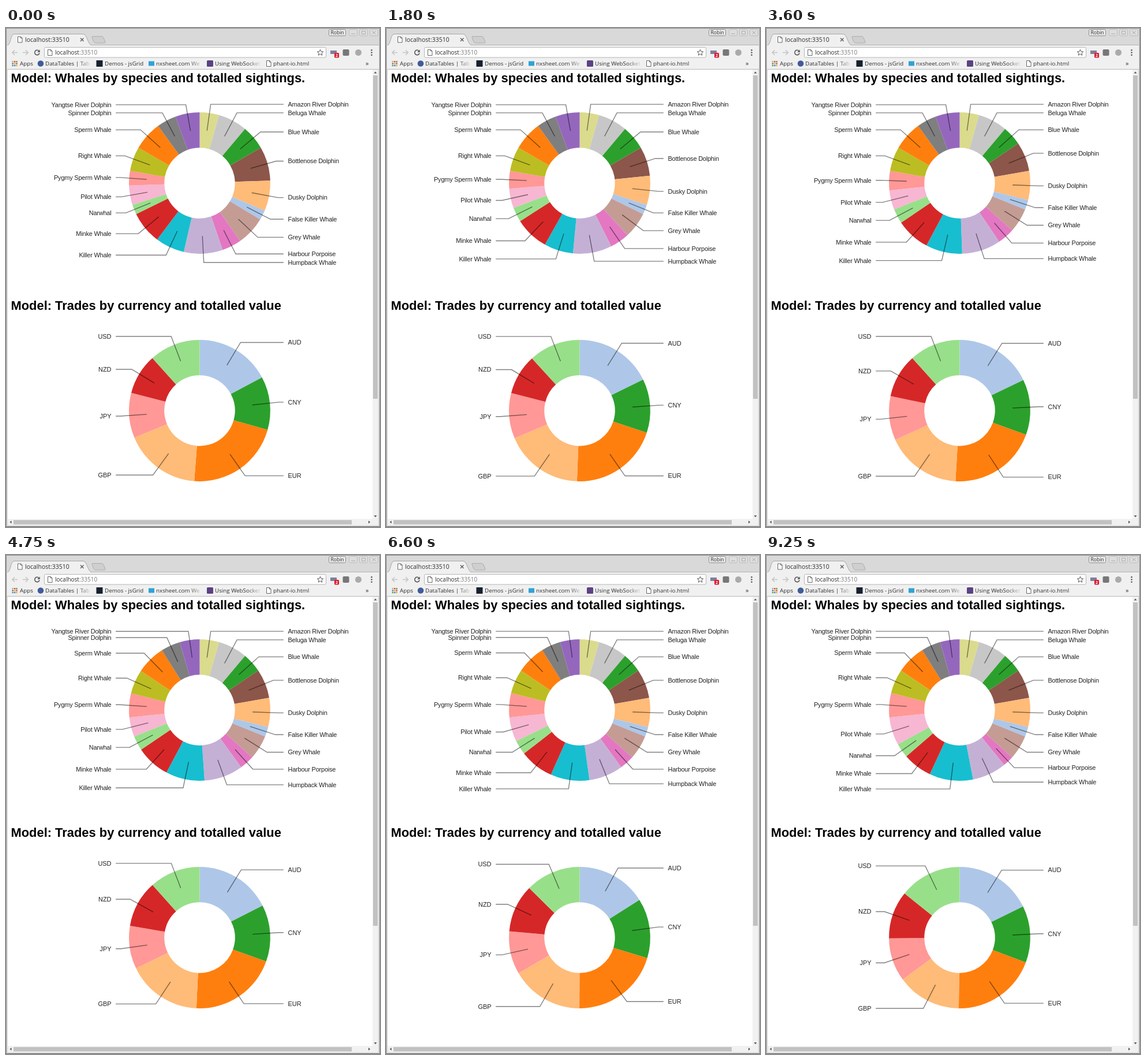
An HTML page that plays this animation: 648 by 864 pixels, repeating every 9.35 s.

```html
<!DOCTYPE html>
<html lang="en">
<head>
<meta charset="utf-8">
<title>localhost:33510</title>
<style>
  html, body { margin: 0; width: 100%; height: 100%; overflow: hidden; background: #fff; }
  svg { display: block; width: 648px; height: 864px; }
  .ui { font-family: "Open Sans", "Noto Sans", sans-serif; fill: #2e2e2e; }
  h1, .head { font: bold 21.9px "Liberation Sans", Arial, sans-serif; fill: #000; }
  .label { font: 10.95px "Liberation Sans", Arial, sans-serif; fill: #222; }
  .tight { letter-spacing: -.19px; }
  .lead { fill: none; stroke: #000; stroke-width: 1.37; opacity: .5; }
</style>
</head>
<body>
<svg viewBox="0 0 648 864" xmlns="http://www.w3.org/2000/svg">
  <defs>
    <linearGradient id="fade">
      <stop offset="0" stop-color="#f0f0f0" stop-opacity="0"/>
      <stop offset="1" stop-color="#f0f0f0"/>
    </linearGradient>
    <g id="page">
      <path d="M.5 .5H5.5L8 3V10.5H.5Z" fill="#fff" stroke="#666"/>
      <path d="M5.5 .5V3H8" fill="none" stroke="#666"/>
    </g>
  </defs>

  <!-- window frame and tab strip -->
  <rect width="648" height="864" fill="#d9d9d9"/>
  <path d="M.5 864V.5H647.5V864" fill="none" stroke="#8a8a8a"/>
  <path d="M1 863.5H647" stroke="#5a5a5a"/>
  <rect x="2" y="30" width="644" height="42" fill="#f0f0f0"/>
  <path d="M2 29.5H646" stroke="#b2b2b2"/>
  <path d="M3 30C8 29 8 11 14 11H134C140 11 142 29 148 30Z" fill="#f0f0f0"/>
  <path d="M3 29.5C8 29 8 10.5 14 10.5H134C140 10.5 142 29 148 29.5" fill="none" stroke="#a8a8a8"/>
  <path d="M150 14.5H165Q168 14.5 169 17L172 24Q172 26 170 26H156Q153 26 152 24L149 16Q149 14.5 150 14.5Z" fill="#cfcfcf" stroke="#adadad"/>
  <use href="#page" x="20" y="14.5"/>
  <path d="M129 17.5L134.5 23M134.5 17.5L129 23" stroke="#555" stroke-width="1.2"/>
  <rect x="559.5" y="2.5" width="29" height="11" rx="2" fill="#e9e9e9" stroke="#8d8d8d"/>
  <g fill="#dedede" stroke="#bdbdbd">
    <rect x="594.5" y="2.5" width="14" height="11" rx="2"/>
    <rect x="612.5" y="2.5" width="14" height="11" rx="2"/>
    <rect x="630.5" y="2.5" width="14" height="11" rx="2"/>
    <path d="M598 10H605M616.5 5.5H622.5V10.5H616.5ZM634.5 5.5L640.5 10.5M640.5 5.5L634.5 10.5" fill="none" stroke="#aaa"/>
  </g>

  <!-- toolbar -->
  <g fill="none" stroke-width="1.5">
    <path d="M20 42.5H11M15 38.3L10.8 42.5L15 46.7M29 42.5H38M34 38.3L38.2 42.5L34 46.7" stroke="#c4c4c4"/>
    <path d="M57 39.6A4.2 4.2 0 1 0 58 43.5" stroke="#555"/>
  </g>
  <path d="M58.7 37.5V42H54.2Z" fill="#555"/>
  <rect x="66.5" y="33.5" width="488" height="17.5" rx="2" fill="#fff" stroke="#b5b5b5"/>
  <use href="#page" x="72" y="37"/>
  <path d="M544.5 37.3L546 40.7L549.7 41L546.9 43.5L547.8 47.2L544.5 45.2L541.2 47.2L542.1 43.5L539.3 41L543 40.7Z" fill="none" stroke="#555"/>
  <rect x="562" y="39" width="11" height="6" fill="#7d7f9c"/>
  <rect x="569" y="43" width="8" height="8.5" rx="1.5" fill="#e0162b"/>
  <rect x="583.5" y="37" width="11" height="11" rx="2" fill="#777"/>
  <circle cx="610.5" cy="42.5" r="5.5" fill="#aaa"/>
  <g fill="#555"><circle cx="633.5" cy="38.3" r="1.3"/><circle cx="633.5" cy="42.5" r="1.3"/><circle cx="633.5" cy="46.7" r="1.3"/></g>

  <!-- bookmarks -->
  <g id="apps"></g>
  <circle cx="60" cy="61.5" r="5.3" fill="#3f5c9a"/>
  <rect x="156.5" y="56" width="11" height="11" fill="#16202e"/>
  <rect x="247" y="57.5" width="10" height="8" fill="#2ea3d6"/>
  <rect x="348" y="56" width="11" height="11" rx="1.5" fill="#5b4184"/>
  <use href="#page" x="451" y="56"/>
  <g class="ui" font-size="9.8">
    <text x="33" y="24" font-size="10.5">localhost:33510</text>
    <text x="85" y="45.8" font-size="10">localhost<tspan fill="#777">:33510</tspan></text>
    <text x="574" y="11" text-anchor="middle" font-size="8.6">Robin</text>
    <text x="573" y="50" text-anchor="middle" font-size="7" font-weight="bold" style="fill:#fff">2</text>
    <text x="24" y="65">Apps</text>
    <text x="68" y="65">DataTables | Tab</text>
    <text x="171" y="65">Demos - jsGrid</text>
    <text x="260" y="65">nxsheet.com We</text>
    <text x="362" y="65">Using WebSocket</text>
    <text x="463" y="65">phant-io.html</text>
    <text x="623" y="65" font-size="11">»</text>
  </g>
  <g fill="url(#fade)">
    <rect x="124" y="54" width="25" height="15"/>
    <rect x="316" y="54" width="25" height="15"/>
    <rect x="418" y="54" width="25" height="15"/>
  </g>

  <!-- page and scrollbars -->
  <path d="M2 71.5H646" stroke="#b8b8b8"/>
  <rect x="3" y="72" width="632" height="778" fill="#fff"/>
  <path d="M635 72H645V861H3V850H635Z" fill="#f1f1f1"/>
  <rect x="636" y="82" width="8" height="560" fill="#c1c1c1"/>
  <rect x="13" y="852" width="586" height="7.5" fill="#c1c1c1"/>
  <path d="M637.5 78.5L640 75.5L642.5 78.5ZM637.5 844L640 847L642.5 844ZM9.5 853L6.5 855.5L9.5 858ZM628 853L631 855.5L628 858Z" fill="#505050"/>
  <text class="head" x="8.5" y="94">Model: Whales by species and totalled sightings.</text>
  <text class="head" x="8.5" y="488">Model: Trades by currency and totalled value</text>
  <g id="whales" transform="translate(335.5 268.5)"></g>
  <g id="trades" transform="translate(335.5 662.5)"></g>
</svg>

<script>
const LOOP = 9350, STEP = 50, LAST = 9250;
const TICK = 925, FIRST = -603, DUR = 1000;
const R = 153, TAU = Math.PI * 2;

const species = [
  ["Amazon River Dolphin", "#dbdb8d", 4], ["Beluga Whale", "#c7c7c7", 6],
  ["Blue Whale", "#2ca02c", 5], ["Bottlenose Dolphin", "#8c564b", 7],
  ["Dusky Dolphin", "#ffbb78", 7], ["False Killer Whale", "#aec7e8", 2],
  ["Grey Whale", "#c49c94", 6], ["Harbour Porpoise", "#e377c2", 4],
  ["Humpback Whale", "#c5b0d5", 8], ["Killer Whale", "#17becf", 6],
  ["Minke Whale", "#d62728", 6], ["Narwhal", "#98df8a", 2],
  ["Pilot Whale", "#f7b6d2", 4], ["Pygmy Sperm Whale", "#ff9896", 3],
  ["Right Whale", "#bcbd22", 5], ["Sperm Whale", "#ff7f0e", 6],
  ["Spinner Dolphin", "#7f7f7f", 4], ["Yangtse River Dolphin", "#9467bd", 5]
];
const currencies = [
  ["AUD", "#aec7e8"], ["CNY", "#2ca02c"], ["EUR", "#ff7f0e"], ["GBP", "#ffbb78"],
  ["JPY", "#ff9896"], ["NZD", "#d62728"], ["USD", "#98df8a"]
];

// Each tick one sighting leaves the window and another enters: [tick, out, in]
const sightings = [
  [0, 4, 10], [1, 3, 11], [2, 6, 13], [3, 2, 9], [4, 7, 9],
  [5, 17, 13], [6, 8, 12], [8, 10, 9], [10, 7, 12]
];
// Slice edges in degrees, reached at the end of the given tick
const totals = [
  [0, [62, 105.8, 184.4, 247.5, 284.6, 318]],
  [1, [60.5, 104.4, 178.5, 247, 284.4, 317.7]],
  [2, [65.9, 110.3, 184.2, 247.1, 284.4, 317.6]],
  [5, [62.9, 109.7, 182.6, 244.2, 279.5, 318.2]],
  [7, [57.6, 106.7, 180.1, 239.6, 275, 314.3]],
  [8, [63.4, 111.5, 181.6, 240, 275.6, 314.5]],
  [10, [63.9, 110.4, 180.6, 232.7, 268.5, 307.9]]
];

const byId = id => document.getElementById(id);

function add(parent, tag, attrs) {
  const node = document.createElementNS("http://www.w3.org/2000/svg", tag);
  for (const key in attrs) node.setAttribute(key, attrs[key]);
  return parent.appendChild(node);
}

function ease(u) {
  u = Math.max(0, Math.min(1, u));
  return u < .5 ? 4 * u ** 3 : 1 - 4 * (1 - u) ** 3;
}

const progress = (tick, t) => ease((t - FIRST - tick * TICK) / DUR);

const polar = (r, a) => [r * Math.sin(a), -r * Math.cos(a)].map(v => v.toFixed(2));

function ringPath(a, b) {
  const big = b - a > Math.PI ? 1 : 0, out = R * .8, inn = R * .4;
  return `M${polar(out, a)}A${out} ${out} 0 ${big} 1 ${polar(out, b)}` +
    `L${polar(inn, b)}A${inn} ${inn} 0 ${big} 0 ${polar(inn, a)}Z`;
}

function makeChart(id, rows, style) {
  const root = byId(id);
  const slices = rows.map(row => add(root, "path", { fill: row[1] }));
  const labels = rows.map(row => {
    const label = add(root, "text", { class: "label " + style, dy: ".35em" });
    label.textContent = row[0];
    return label;
  });
  const leads = rows.map(() => add(root, "polyline", { class: "lead" }));

  return values => {
    const unit = TAU / values.reduce((s, v) => s + v, 0);
    let from = 0;
    values.forEach((v, i) => {
      const to = from + v * unit, mid = (from + to) / 2;
      const side = mid < Math.PI ? 1 : -1;
      const elbow = polar(R * .9, mid);
      slices[i].setAttribute("d", ringPath(from, to));
      leads[i].setAttribute("points", `${polar(R * .6, mid)} ${elbow} ${side * R * .95},${elbow[1]}`);
      labels[i].setAttribute("x", side * R);
      labels[i].setAttribute("y", elbow[1]);
      labels[i].setAttribute("text-anchor", side > 0 ? "start" : "end");
      from = to;
    });
  };
}

function whaleValues(t) {
  const counts = species.map(row => row[2]);
  for (const [tick, out, inn] of sightings) {
    const p = progress(tick, t);
    counts[out] -= p;
    counts[inn] += p;
  }
  return counts;
}

function tradeValues(t) {
  const edges = totals[0][1].slice();
  for (let k = 1; k < totals.length; k++) {
    const [start, a] = totals[k - 1], [end, b] = totals[k];
    let p = 0;
    for (let tick = start + 1; tick <= end; tick++) p += progress(tick, t) / (end - start);
    edges.forEach((_, i) => edges[i] += (b[i] - a[i]) * p);
  }
  return [...edges, 360].map((e, i) => e - (i ? edges[i - 1] : 0));
}

const dots = ["#d9483b", "#e0a82e", "#3f7fd6", "#4a9f52"];
for (let i = 0; i < 9; i++) {
  add(byId("apps"), "rect", {
    x: 10.5 + i % 3 * 3.4, y: 57 + Math.floor(i / 3) * 3.4,
    width: 2.4, height: 2.4, fill: dots[(i * 3 + 1) % 4]
  });
}

const drawWhales = makeChart("whales", species, "tight");
const drawTrades = makeChart("trades", currencies, "");
const began = performance.now();

function frame() {
  const now = (performance.now() - began) % LOOP;
  const t = Math.min(LAST, Math.floor(now / STEP) * STEP);
  drawWhales(whaleValues(t));
  drawTrades(tradeValues(t));
  requestAnimationFrame(frame);
}
frame();
</script>
</body>
</html>
```
